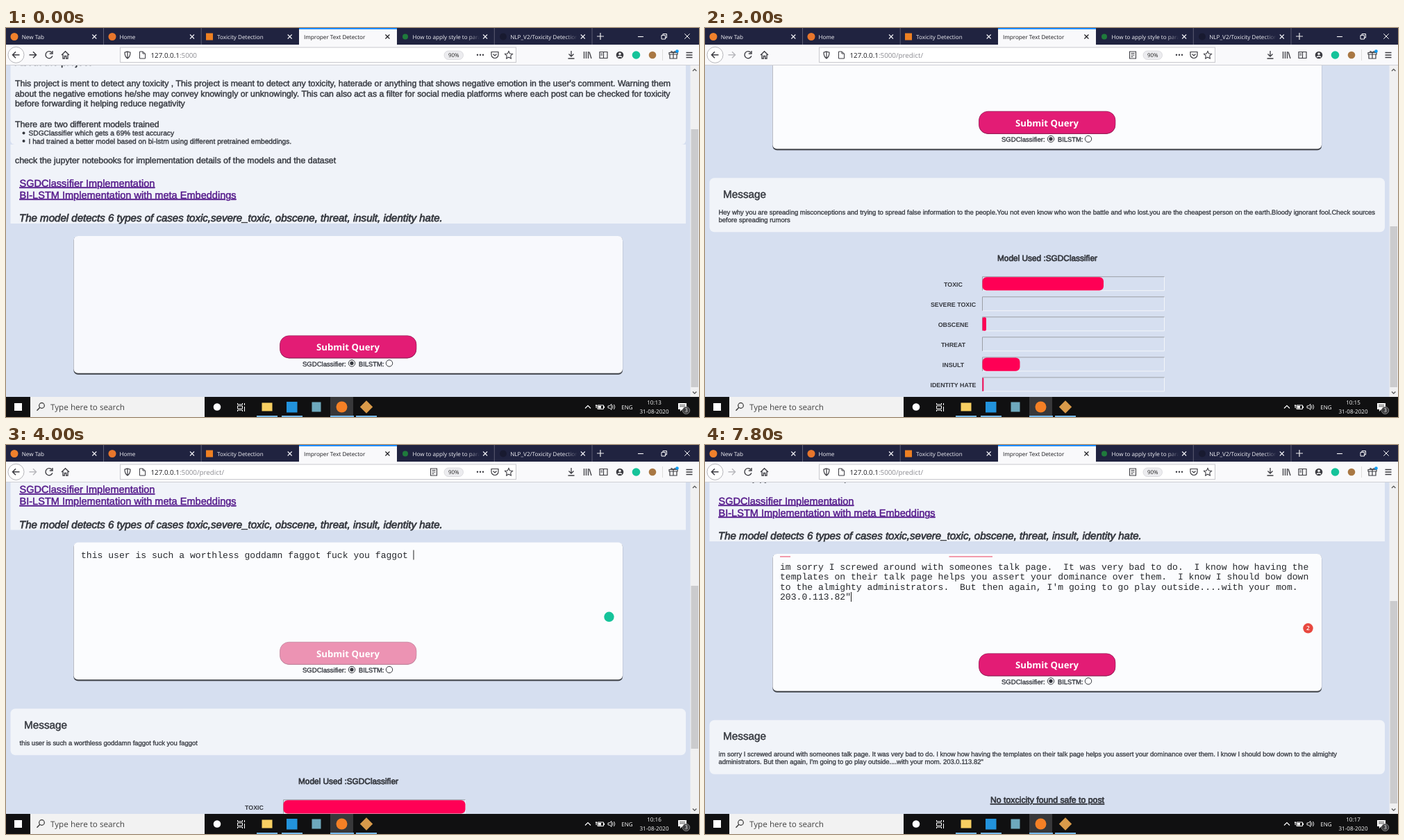
Animation, 998 px wide and 561 px high, one loop 9 s. Source, as an HTML page:

```html
<!DOCTYPE html>
<html lang="en">
<head>
<meta charset="utf-8">
<title>Improper Text Detector</title>
<style>
  html, body { margin: 0; width: 100%; height: 100%; overflow: hidden; background: #d6dff0; }
  svg { display: block; width: 998px; height: 561px; }
  text { white-space: pre; text-rendering: geometricPrecision; }
  .page { font-family: "Liberation Sans", Arial, sans-serif; }
  .ui { font-family: "Open Sans", "Noto Sans", sans-serif; }
  .mono { font-family: "Liberation Mono", "Courier New", monospace; }
</style>
</head>
<body>
<svg id="stage" viewBox="0 0 998 561"></svg>
<script>
const LOOP = 9000;
const INK = '#35383f', ICON = '#3c3c42', PINK = '#ff0055';

const rude = 'this user is such a worthless goddamn faggot fuck you faggot';

// top: y of the input card; thumb: scrollbar thumb [y, height]; bars: widths in px
const scenes = [
  { at: 0, top: 300, clock: '10:13', thumb: [146, 372] },
  { at: 1000, top: 300, clock: '10:15', thumb: [146, 372],
    input: ['Hey why you are spreading misconceptions and trying to spread false information to the people.You',
      'not even know who won the battle and who lost.you are the cheapest person on the earth.Bloody',
      'ignorant fool.Check sources before spreading rumors'] },
  { at: 2000, top: -23.5, clock: '10:15', thumb: [286, 232], predicted: true,
    message: ['Hey why you are spreading misconceptions and trying to spread false information to the people.You not even know who won the battle and who lost.you are the cheapest person on the earth.Bloody ignorant fool.Check sources',
      'before spreading rumors'],
    bars: [174.5, 0, 5.5, 0, 54, 1.8] },
  { at: 4000, top: 140.5, clock: '10:16', thumb: [203, 235], predicted: true, pressed: true,
    input: [rude + ' '], caret: [587, 311], badge: '#15c39a',
    message: [rude], bars: [262, 49, 262, 1.2, 262, 127] },
  { at: 5000, top: -12.5, clock: '10:16', thumb: [283, 234], predicted: true, badge: '#15c39a',
    message: [rude], bars: [262, 49, 262, 1.2, 262, 127] },
  { at: 6000, top: 157, clock: '10:17', thumb: [225, 292], predicted: true,
    input: ['im sorry I screwed around with someones talk page.  It was very bad to do.  I know how having the',
      'templates on their talk page helps you assert your dominance over them.  I know I should bow down',
      "to the almighty administrators.  But then again, I'm going to go play outside....with your mom.",
      '203.0.113.82"'],
    caret: [210.5, 355], badge: '#e8483f', count: 2, marks: [[108, 15], [351.5, 62.5]],
    message: ['im sorry I screwed around with someones talk page. It was very bad to do. I know how having the templates on their talk page helps you assert your dominance over them. I know I should bow down to the almighty',
      "administrators. But then again, I'm going to go play outside....with your mom. 203.0.113.82\""] },
];

const rect = (x, y, w, h, fill, more = '') =>
  `<rect x="${x}" y="${y}" width="${w}" height="${h}" fill="${fill}" ${more}/>`;
const circle = (x, y, r, fill, more = '') =>
  `<circle cx="${x}" cy="${y}" r="${r}" fill="${fill}" ${more}/>`;
const line = (d, color = ICON, w = 1.2) =>
  `<path d="${d}" fill="none" stroke="${color}" stroke-width="${w}"/>`;
const text = (x, y, s, size, fill = INK, more = '') =>
  `<text x="${x}" y="${y}" font-size="${size}" fill="${fill}" ${more}>${s}</text>`;
const heavy = (w, color = INK) => `stroke="${color}" stroke-width="${w}"`;
const middle = 'text-anchor="middle"';
const cross = (x, y, r, color, w) =>
  line(`M${x - r} ${y - r}l${2 * r} ${2 * r}m0 ${-2 * r}l${-2 * r} ${2 * r}`, color, w);

function intro() {
  const panel = '#f0f3f9';
  const body = (y, s) => text(13, y, s, 12.3, INK, heavy(.42));
  const bullet = (y, s) => circle(25.5, y - 3.5, 2, INK) + text(32.5, y, s, 10.2, INK, heavy(.35));
  const link = (y, s) => text(19.5, y, s, 14.55, '#551a8b', heavy(.45, '#551a8b') + ' text-decoration="underline"');
  return rect(6.5, -60, 972.5, 228, panel, 'rx="6"') +
    rect(6.5, 168, 972.5, 114, panel) +
    text(13, 53.5, 'About the project', 14.5, INK, heavy(.4)) +
    body(84, "This project is ment to detect any toxicity , This project is meant to detect any toxicity, haterade or anything that shows negative emotion in the user's comment. Warning them") +
    body(98.5, 'about the negative emotions he/she may convey knowingly or unknowingly. This can also act as a filter for social media platforms where each post can be checked for toxicity') +
    body(113, 'before forwarding it helping reduce negativity') +
    body(142.5, 'There are two different models trained') +
    bullet(155, 'SDGClassifier which gets a 69% test accuracy') +
    bullet(166.5, 'I had trained a better model based on bi-lstm using different pretrained embeddings.') +
    body(195, 'check the jupyter notebooks for implementation details of the models and the dataset') +
    link(228.5, 'SGDClassifier Implementation') +
    link(245.5, 'BI-LSTM Implementation with meta Embeddings') +
    text(19, 279, 'The model detects 6 types of cases toxic,severe_toxic, obscene, threat, insult, identity hate.',
      15.05, INK, heavy(.75) + ' font-style="italic"');
}

function card(s) {
  const radio = (x, on) => circle(x, 483.5, 4.7, '#fff', heavy(1)) + (on ? circle(x, 483.5, 2.7, INK) : '');
  let out = rect(97, 301, 791.5, 199, '#8f96a5', 'rx="7" opacity=".5"') +
    rect(97.5, 300.5, 790.5, 199.2, '#42454b', 'rx="6"') +
    rect(97.5, 300, 790.5, 197.8, s.predicted ? '#fbfcfe' : '#f8f9fd', 'rx="6"');
  (s.marks || []).forEach(([x, w]) => out += rect(x, 303, w, 2, '#f29bac'));
  (s.input || []).forEach((row, i) =>
    out += text(108, 322.5 + i * 14.6, row, 13.09, '#26282c', 'class="mono"'));
  if (s.caret) out += rect(s.caret[0] - .5, s.caret[1], 1, 14, '#222');
  if (s.badge) out += circle(868.5, 407.3, 7.2, s.badge);
  if (s.count) out += text(868.5, 410.3, s.count, 8.5, '#fff', middle + ' class="ui" font-weight="600"');
  const fill = s.pressed ? '#ec93b3' : '#e31c75';
  const edge = s.pressed ? '#b9839a' : '#8a1e52';
  return out + rect(394.5, 444, 196.5, 32.4, edge, 'rx="13"') +
    rect(394.5, 443.7, 196.5, 32, fill, `rx="13" stroke="${edge}" stroke-width=".6"`) +
    text(492.5, 465.3, 'Submit Query', 13.2, '#fff', middle + ' class="ui" font-weight="700"') +
    text(427, 487.5, 'SGDClassifier:', 9.55, INK, heavy(.35)) + radio(498, true) +
    text(508, 487.5, 'BILSTM:', 9.4, INK, heavy(.35)) + radio(552, false);
}

function results(s) {
  if (!s.message) return '';
  const height = 56 + 11 * s.message.length;
  const end = 539.7 + height;
  let out = rect(6.5, 539.7, 972.5, height, '#f1f4f9', 'rx="7"') +
    text(26, 568.3, 'Message', 15.3, INK, heavy(.5));
  s.message.forEach((row, i) => out += text(19.5, 592 + 11 * i, row, 9.48, INK, heavy(.3)));
  if (!s.bars) return out + text(493, end + 41.5, 'No toxcicity found safe to post', 12.3, INK,
    middle + ' text-decoration="underline" ' + heavy(.7));
  out += text(493, end + 41.7, 'Model Used :SGDClassifier', 11.83, INK, middle + ' ' + heavy(.7));
  ['TOXIC', 'SEVERE TOXIC', 'OBSCENE', 'THREAT', 'INSULT', 'IDENTITY HATE'].forEach((name, i) => {
    const y = end + 64 + i * 29.05;
    out += text(357.5, y + 15, name, 8.85, INK, middle + ' font-weight="700"') +
      line(`M399.5 ${y + 20.5}h262v-20`, '#f3f5f9', 1) +
      line(`M399.5 ${y + 20.5}v-20h262`, '#9c9fa6', 1);
    const w = s.bars[i];
    if (w) out += rect(399.5, y + 1, w, 19.4, PINK, `rx="${Math.min(6, w / 3)}"`);
  });
  return out;
}

function tabs() {
  const bar = '#202340';
  let out = rect(0, 0, 998, 24, bar) + rect(422, 0, 141, 24, '#f9f9fb') + rect(422, 0, 141, 1.8, '#0a84ff');
  ['New Tab', 'Home', 'Toxicity Detection', 'Improper Text Detector',
    'How to apply style to para', 'NLP_V2/Toxicity Detection a'].forEach((name, i) => {
    const x = i * 140.7, active = i === 3;
    const color = active ? '#17171b' : '#f3f3f7';
    out += text(active ? 429 : x + 22.7, 15.5, name, 8.13, color, 'class="ui"');
    if (i > 3) out += rect(x + 102, 3, 22, 19, 'url(#fade)') + rect(x + 119, 3, 20, 19, bar);
    out += cross(x + 127.3, 12.5, 3, color, 1.1);
    if (!active && i !== 2) out += rect(x + 140, 0, 1, 24, '#5b5d73');
  });
  return out + circle(12, 12.5, 5.5, '#f0812c') + circle(153, 12.5, 5.5, '#e8762c') +
    rect(288, 7.5, 10, 10, '#ee8022') + circle(575, 12.5, 4, '#1f7a3c') + circle(716, 12.5, 5, '#181a30') +
    line('M856 7v10m-5-5h10', '#eee', 1.2) + line('M910 12.5h8', '#fff', 1.1) +
    line('M944 10.5h5.5v5.5h-5.5zM946 10.5v-2h5.5v5.5h-2', '#fff', 1) + cross(981, 12, 3.7, '#fff', 1);
}

function toolbar(s) {
  const arrow = (x, dir, color) =>
    line(`M${x - 5 * dir} 38.8h${10 * dir}m${-4.5 * dir} -4.5l${4.5 * dir} 4.5l${-4.5 * dir} 4.5`, color, 1.5);
  const path = s.predicted ? '/predict/' : '';
  return rect(0, 24, 998, 29.5, '#f9f9fb') + rect(0, 53, 998, 1, '#cfd0d6') +
    circle(14.5, 38.8, 11.5, '#fff', 'stroke="#b5b5ba"') + arrow(14.5, -1, ICON) +
    arrow(38.5, 1, s.predicted ? '#b9b9be' : ICON) +
    line('M66 35.6a5 5 0 1 0 .8 4.6M67 33v4h-4.2', ICON, 1.4) +
    line('M80 39l5.5-5.3 5.5 5.3M82 38v6h2.3v-3.5h2.4v3.5h2.3v-6', ICON, 1.3) +
    rect(164.5, 28, 570, 21.5, '#fff', 'stroke="#c9c9ce"') +
    line('M175 34l4 1.3c0 4.5-.8 6.8-4 8.7-3.2-1.9-4-4.2-4-8.7zM175 34v10') +
    line('M192.5 34h4.5l3.5 3v7h-8zM197 34v3h3.5', ICON, 1) +
    text(208.5, 42.5, `127.0.0.1<tspan fill="#8a8a90">:5000${path}</tspan>`, 9.8, '#1c1c20', 'class="ui"') +
    (s.predicted ? line('M611.5 34h9v10h-9zM613.5 36.5h5m-5 2.5h5m-5 2.5h3', ICON, 1.1) : '') +
    rect(631, 33, 27.5, 12.5, '#ececef', 'rx="6.2" stroke="#d2d2d6" stroke-width=".7"') +
    text(644.7, 42.2, '90%', 7.9, '#222', middle + ' class="ui"') +
    [679, 683, 687].map(x => circle(x, 38.8, 1.2, ICON)).join('') +
    line('M699 34.5h10v4a5 5 0 0 1-10 0zM701.5 37.5l2.5 2.5 2.5-2.5') +
    line('M724 33.5l1.7 3.5 3.8.5-2.8 2.7.7 3.8-3.4-1.8-3.4 1.8.7-3.8-2.8-2.7 3.8-.5z', ICON, 1.1) +
    line('M814 33v8m-3.5-3.5l3.5 3.5 3.5-3.5M809.5 44h9', ICON, 1.3) +
    line('M832.5 34v10m3-10v10m3-10v10m1.5-9.5l3 9.5', ICON, 1.3) +
    line('M855 34.5h11v9h-11zM860.5 34.5v9M856.5 37h2.5m-2.5 2h2.5') +
    circle(884, 39, 5.3, ICON) + circle(884, 37.3, 1.7, '#fff') + line('M881 42q3-2.5 6 0', '#fff', 1.3) +
    circle(907.5, 39, 5.8, '#15c39a') + circle(931, 39, 5.3, '#a97844') + rect(945, 31, 1, 16, '#ddd') +
    line('M956 38h10v6h-10zM955 35.5h12v2.5h-12zM961 35.5v8.5M961 35.5q-4-4-3 0m3 0q4-4 3 0') +
    circle(966.5, 33.5, 2.3, '#0a9cf5') +
    line('M979.5 35.5h9m-9 3.5h9m-9 3.5h9', ICON, 1.3);
}

function scrollbar([y, h]) {
  return rect(985.5, 54, 12.5, 478, '#f0f0f1') + rect(986.5, y, 10.5, h, '#cbcbcd') +
    line('M989 62l2.7-2.7 2.7 2.7', '#555', 1.3) + line('M989 524.5l2.7 2.7 2.7-2.7', '#555', 1.3);
}

function taskbar(clock) {
  const white = '#fff';
  const small = (x, y, s) => text(x, y, s, 8.05, white, middle + ' class="ui"');
  return rect(0, 532, 998, 29, '#101011') + rect(12, 541, 11, 11, white) +
    rect(35, 532, 251, 29, '#f2f2f2') + circle(51.5, 544.5, 3.8, 'none', 'stroke="#333" stroke-width="1.2"') +
    line('M48.8 547.2l-4.3 4.6', '#333', 1.3) +
    text(64, 551, 'Type here to search', 11.7, '#444', 'class="ui"') +
    circle(304, 546.5, 5.3, white) +
    line('M333.5 541v2h7v-2M333.5 545h7v4h-7zM333.5 553v-2h7v2M343.5 541v3m0 2v7', white, 1) +
    rect(467, 532, 33, 29, '#38383a') +
    [361, 397, 467, 504].map(x => rect(x, 559, x === 467 ? 34 : 30, 2, '#76b9ed')).join('') +
    rect(368.5, 540.5, 15, 12, '#f7cf62') + rect(404, 539, 15.5, 15.5, '#2293dc') +
    rect(440.5, 539.5, 13, 14, '#6ea9bd') + circle(483.5, 546.5, 8, '#f58025') +
    rect(512.5, 540, 13, 13, '#d99a4a', 'transform="rotate(45 519 546.5)"') +
    line('M834 548.5l4-4 4 4', white) +
    line('M852 544h8.5v5.5h-8.5zM861.5 545.5v2.5M850 543v5m-1-3.5h2', white, 1) + rect(853, 545, 4, 3.5, white) +
    line('M867 545h2l3-2.5v8l-3-2.5h-2zM873.5 544.5q1.5 2 0 4M875.5 543q2.5 3.5 0 7', white, .9) +
    small(894.5, 549.5, 'ENG') + small(933.5, 542.8, clock) + small(933.5, 555.8, '31-08-2020') +
    `<path d="M968 541h12v9h-6l-3 3v-3h-3z" fill="${white}"/>` +
    line('M970 543.7h8m-8 2.2h8', '#222', .8) +
    circle(979.5, 551.5, 5.2, '#3b3b3d', 'stroke="#999" stroke-width=".8"') + small(979.5, 554.4, '3');
}

const defs = `<defs><linearGradient id="fade"><stop stop-color="#202340" stop-opacity="0"/>
  <stop offset=".8" stop-color="#202340"/></linearGradient></defs>`;

const draw = s => defs + rect(0, 0, 998, 561, '#d6dff0') +
  `<g class="page" transform="translate(0 ${s.top - 300})">${intro()}${card(s)}${results(s)}</g>` +
  scrollbar(s.thumb) + tabs() + toolbar(s) + taskbar(s.clock);

const stage = document.getElementById('stage');
let shown;

function tick() {
  const time = performance.now() % LOOP;
  const scene = scenes.filter(s => s.at <= time).pop();
  if (scene !== shown) stage.innerHTML = draw(shown = scene);
  requestAnimationFrame(tick);
}
tick();
</script>
</body>
</html>
```
